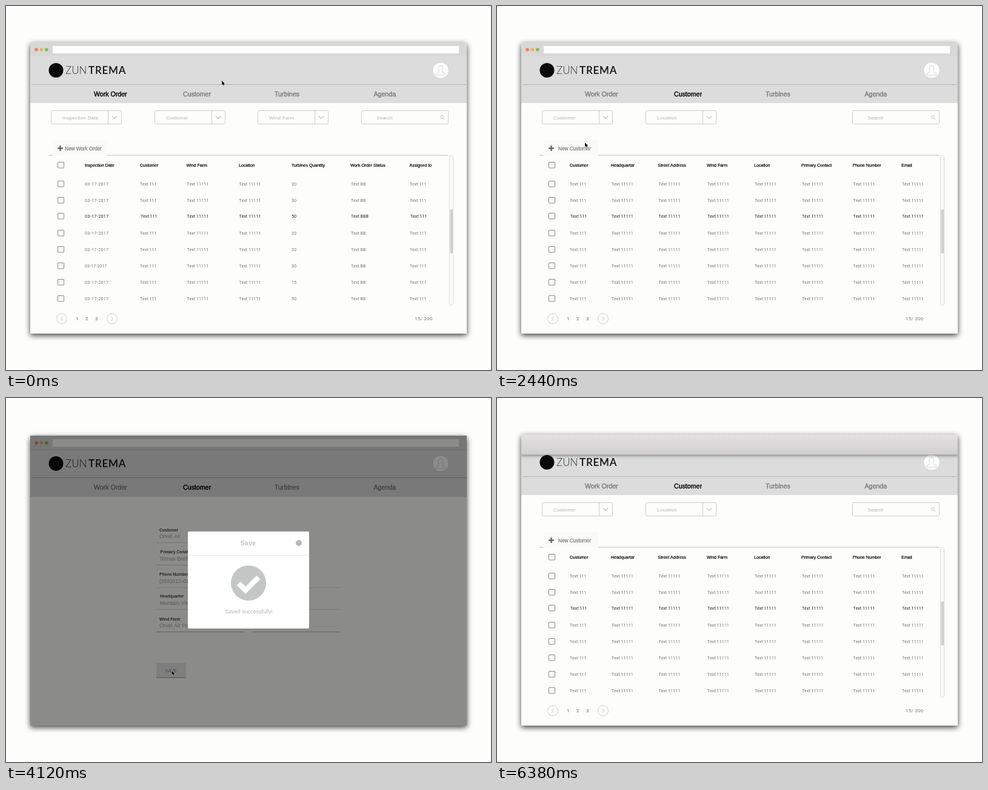
An HTML page with a canvas for the animation above (6500 ms loop, 800x600 px).

```html
<!DOCTYPE html>
<html lang="en">
<head>
<meta charset="utf-8">
<style>
  html, body { margin: 0; width: 100%; height: 100%; overflow: hidden; background: #fdfdfb; }
  canvas { display: block; }
</style>
</head>
<body>
<canvas id="stage" width="800" height="600"></canvas>
<script>
const g = document.getElementById('stage').getContext('2d');
const LOOP = 6500, SHOW_CUSTOMERS = 1140, OPEN_FORM = 2680, OPEN_MODAL = 4120, CLOSE_MODAL = 5120, BAR_START = 5480;
const SANS = '"Liberation Sans", Arial, sans-serif';
const CELL = 'Roboto, Arial, sans-serif';
const BRAND = 'Lato, "Open Sans", sans-serif';
const PAPER = '#fdfdfb';

// y is the middle of the capitals; heft thickens the regular weight
function text(s, x, y, size, color, { heft = 0, gap = 0, weight = 400, font = SANS } = {}) {
  g.font = `${weight} ${size}px ${font}`;
  g.letterSpacing = gap + 'px';
  g.fillStyle = g.strokeStyle = color;
  g.fillText(s, x, y + size * .36);
  if (heft) {
    g.lineWidth = heft;
    g.strokeText(s, x, y + size * .36);
  }
}

function box(x, y, w, h, fill, stroke, r = 0, width = 1) {
  g.beginPath();
  g.roundRect(x, y, w, h, r);
  paint(fill, stroke, width);
}

function disc(x, y, r, fill, stroke, width = 1) {
  g.beginPath();
  g.arc(x, y, r, 0, Math.PI * 2);
  paint(fill, stroke, width);
}

function line(points, color, width = 1) {
  g.beginPath();
  points.forEach(([x, y]) => g.lineTo(x, y));
  paint(null, color, width);
}

function paint(fill, stroke, width) {
  if (fill) { g.fillStyle = fill; g.fill(); }
  if (stroke) { g.strokeStyle = stroke; g.lineWidth = width; g.stroke(); }
}

function plus(x, y, r, color, width) {
  line([[x - r, y], [x + r, y]], color, width);
  line([[x, y - r], [x, y + r]], color, width);
}

function windowShadow(top) {
  g.save();
  g.shadowColor = 'rgba(0,0,0,.75)';
  g.shadowBlur = 10;
  g.shadowOffsetY = 3;
  box(40, top, 720, 540 - top, PAPER, null, [4, 4, 0, 0]);
  g.restore();
}

function header(active, isForm) {
  const bottom = isForm ? 161 : 160;
  box(40, 60, 720, bottom - 60, '#dcdcdc', null, [4, 4, 0, 0]);
  box(40, 60, 720, 23, '#d8d8d8', null, [4, 4, 0, 0]);
  if (isForm) line([[40, 83.5], [760, 83.5]], '#c4c4c4');
  ['#f07a5c', '#f0b04e', '#84b84c'].forEach((c, i) => disc(50 + i * 8.4, 72, 2.8, c));
  box(77, 66, 670, 12, PAPER);

  disc(82.5, 106, 12, '#0a0a0a');
  text('ZUN', 98, 106, 17, '#333', { weight: 300, font: BRAND });
  text('TREMA', 136, 106, 17, '#111', { weight: 600, gap: .8, font: BRAND });

  disc(717, 106, 13.5, '#fdfdfd', '#cfcfcf');
  g.beginPath();
  g.ellipse(717, 103, 4, 5, 0, 2.3, 7.1);
  g.lineTo(720, 109);
  g.quadraticCurveTo(725, 110, 725, 114);
  g.lineTo(709, 114);
  g.quadraticCurveTo(709, 110, 714, 109);
  g.closePath();
  paint(null, '#d4d4d4', 1);

  line([[42, 129.5], [758, 129.5]], '#b0b0b0');
  [['Work Order', 145], ['Customer', 292], ['Turbines', 443], ['Agenda', 606.5]].forEach(([s, x]) =>
    text(s, x, 145, 10.6, s === active ? '#000' : '#7c7c7c', { heft: .4 }));
}

function dropdown(x, label) {
  box(x + .5, 172.5, 116, 22, null, '#cdcdcd', 2);
  line([[x + 94.5, 172], [x + 94.5, 195]], '#cdcdcd');
  line([[x + 101, 181.5], [x + 105, 185.5], [x + 109, 181.5]], '#999');
  text(label, x + 19, 184, 8, '#b0b0b0', { gap: .27 });
}

function pager(x, dir) {
  disc(x, 515.5, 8.5, null, '#cfcfcf');
  line([[x - dir * 1.5, 512.5], [x + dir * 1.5, 515.5], [x - dir * 1.5, 518.5]], '#aaa', .8);
}

const rowsY = [293, 320, 346.5, 374, 401, 428, 455, 482];
const quantity = [20, 30, 50, 20, 20, 30, 15, 50];
const wide = () => 'Text 11111';
const short = () => 'Text 111';

// columns: heading, heading x, cell x, cell text by row
const orders = {
  tab: 'Work Order', filters: ['Inspection Date', 'Customer', 'Wind Farm'], button: 'New Work Order', buttonX: 97,
  columns: [
    ['Inspection Date', 130, 130, () => '03-17-2017'],
    ['Customer', 221, 221, short],
    ['Wind Farm', 297.5, 298.5, wide],
    ['Location', 384, 384.5, wide],
    ['Turbines Quantity', 471, 471, i => String(quantity[i])],
    ['Work Order Status', 568, 569, i => i === 2 ? 'Text BBB' : 'Text BB'],
    ['Assigned to', 665.5, 666, short]
  ]
};
const customers = {
  tab: 'Customer', filters: ['Customer', 'Location'], button: 'New Customer', buttonX: 101,
  columns: [
    ['Customer', 120, 120, short],
    ['Headquartar', 188, 189, wide],
    ['Street Address', 265.5, 266.5, wide],
    ['Wind Farm', 346, 347, wide],
    ['Location', 424, 425, wide],
    ['Primary Contact', 502, 503, wide],
    ['Phone Number', 586.5, 587.5, wide],
    ['Email', 667, 668, wide]
  ]
};

function list(page) {
  header(page.tab);
  page.filters.forEach((label, i) => dropdown(Math.round(74 + i * 170.7), label));
  box(586.5, 172.5, 143, 22, null, '#cdcdcd', 2);
  text('Search', 611.5, 184, 8, '#b0b0b0', { gap: .1 });
  disc(719, 183, 2.3, null, '#b4b4b4', .8);
  line([[720.7, 184.7], [723, 187]], '#b4b4b4', .8);

  box(77, 221, 90, 25, '#fafaf8');
  plus(89.5, 234.5, 4.5, '#666', 2.4);
  text(page.button, page.buttonX, 235, 8.2, '#888', { heft: .3 });
  line([[70, 246], [77, 246]], '#bcbcbc');
  line([[167, 246], [730, 246]], '#bcbcbc');

  [262, ...rowsY].forEach(y => box(85.5, Math.floor(y) - 4.5, 10, 9.5, null, '#8a8a8a', .5));
  page.columns.forEach(([title, titleX, x, cell]) => {
    text(title, titleX, 262, 7, '#000', { heft: .2 });
    rowsY.forEach((y, i) => {
      const s = cell(i), dark = i === 2;
      text(s, x + (dark && s === 'Text 111' ? 1 : 0), y, 7, dark ? '#222' : '#757575',
        { gap: s.includes('-') && i !== 5 ? .42 : .1, font: CELL });
    });
  });

  box(731.5, 246.5, 6, 247, null, '#dadada', 3);
  box(732.5, 335, 4.5, 73, '#d0d0d0', null, 2);
  pager(92, -1);
  pager(175, 1);
  [115, 131, 147].forEach((x, i) => text(String(i + 1), x, 515, 8, '#666', { font: CELL }));
  text('15/ 200', 674, 515, 8, '#777', { gap: .25, font: CELL });
}

// label, label x and y, value, value x and y
const fields = [
  ['Customer', 253, 216, 'Orvel Air', 253, 226],
  ['Primary Conatct', 254.5, 251.5, 'Tomas Brell', 253, 262.5],
  ['Phone Number', 253, 289, '(555)010-019', 253, 299.5],
  ['Headquarter', 254, 325, 'Montain View, CA', 254, 336],
  ['Wind Farm', 253, 362.5, 'Orvel Air Park', 253, 372.5],
  ['Email', 412, 289.5, 'nao@vq.test', 412, 300],
  ['Street Address', 412.5, 324.5, '20480 Orlin Lane', 412.5, 335],
  ['Location', 412, 362.5, 'Mason County, MI', 412, 372.5]
];
const ruleY = [236.5, 273.5, 310.5, 346.5, 383.5];

function form() {
  header('Customer', true);
  fields.forEach(([label, lx, ly, value, vx, vy]) => {
    text(label, lx, ly, 6.7, '#444', { weight: 700 });
    text(value, vx, vy, 9, '#a0a0a0');
  });
  ruleY.forEach((y, i) => {
    const color = i === 4 ? '#b4b4b4' : i === 1 ? '#cfcfcf' : '#dedede';
    line([[248, y], [393, y]], color);
    if (i > 1) line([[407, y], [551, y]], color);
  });
  line([[381, 222.5], [384, 225.2], [387, 222.5]], '#222', 1.6);
  disc(421, 260.5, 7.8, '#d2d2d2');
  plus(421, 260.5, 4.3, '#8c8c8c', 2.4);
  box(248, 434.5, 48.5, 25, '#e4e4e4');
  line([[248, 459], [296.5, 459]], '#b0b0b0', 1.4);
  text('SAVE', 262.5, 447, 7, '#808080', { gap: .25 });
}

function modal() {
  box(40, 62, 720, 479, 'rgba(0,0,0,.45)');
  box(300, 220, 200, 160, '#fff', null, 2);
  text('Save', 386.5, 239.5, 11, '#c4c4c4', { weight: 700 });
  line([[300, 259.5], [500, 259.5]], '#e8e8e8');
  disc(483, 239, 5, '#b8b8b8');
  disc(400, 305, 29, '#c4c6c6');
  line([[383.5, 305.5], [395, 317], [416.5, 295.5]], '#fff', 8.5);
  text('Saved successfully!', 361, 352, 9, '#b4b4b4');
}

function titleBar(t) {
  if (t < BAR_START) return;
  const p = Math.min(1, (t - BAR_START) / 420);
  const h = 34 * (1 - (1 - p) ** 3);
  const fill = g.createLinearGradient(0, 26 + h, 0, 60 + h);
  fill.addColorStop(0, '#e3e1e1');
  fill.addColorStop(1, '#d0cece');
  g.save();
  g.shadowColor = 'rgba(0,0,0,.45)';
  g.shadowBlur = 5;
  g.shadowOffsetY = 1;
  box(40, 26 + h, 720, 34, fill);
  g.restore();
  line([[40, 59.5 + h], [760, 59.5 + h]], '#b0aeae');
}

// time, x, y
const path = [
  [20, 356, 123], [1100, 311, 147], [1800, 311, 147], [2620, 122, 236], [2680, 122, 236],
  [3100, 306, 348], [3960, 273.5, 449.5], [4380, 273.5, 449.5], [4740, 497, 227],
  [4900, 482, 238.5], [5100, 482, 238.5], [5520, 500, 48]
];

function cursor(t) {
  const i = path.findIndex(k => k[0] > t);
  if (i < 0) return;
  const b = path[i], a = path[i - 1] || b;
  const p = a === b ? 0 : (t - a[0]) / (b[0] - a[0]);
  const e = p * p * (3 - 2 * p);
  g.save();
  g.translate(a[1] + (b[1] - a[1]) * e, a[2] + (b[2] - a[2]) * e);
  g.beginPath();
  [[0, 0], [0, 7.2], [1.7, 5.6], [2.9, 8.2], [4.1, 7.7], [3, 5.2], [5.2, 5.2]].forEach(([x, y]) => g.lineTo(x, y));
  g.closePath();
  paint(null, 'rgba(255,255,255,.8)', 1);
  paint('#000');
  g.restore();
}

function draw(now) {
  const t = now % LOOP;
  const saving = t >= OPEN_MODAL && t < CLOSE_MODAL;
  const top = saving ? 62 : 60;
  g.fillStyle = PAPER;
  g.fillRect(0, 0, 800, 600);
  windowShadow(top);

  g.save();
  g.beginPath();
  g.rect(40, top, 720, 540 - top);
  g.clip();
  g.save();
  g.translate(0, top - 60);
  if (t < SHOW_CUSTOMERS) list(orders);
  else if (t < OPEN_FORM || t >= CLOSE_MODAL) list(customers);
  else form();
  g.restore();
  if (saving) modal();
  cursor(t);
  titleBar(t);
  g.restore();
}

const start = performance.now();
(function frame() {
  draw(performance.now() - start);
  requestAnimationFrame(frame);
})();
</script>
</body>
</html>
```
